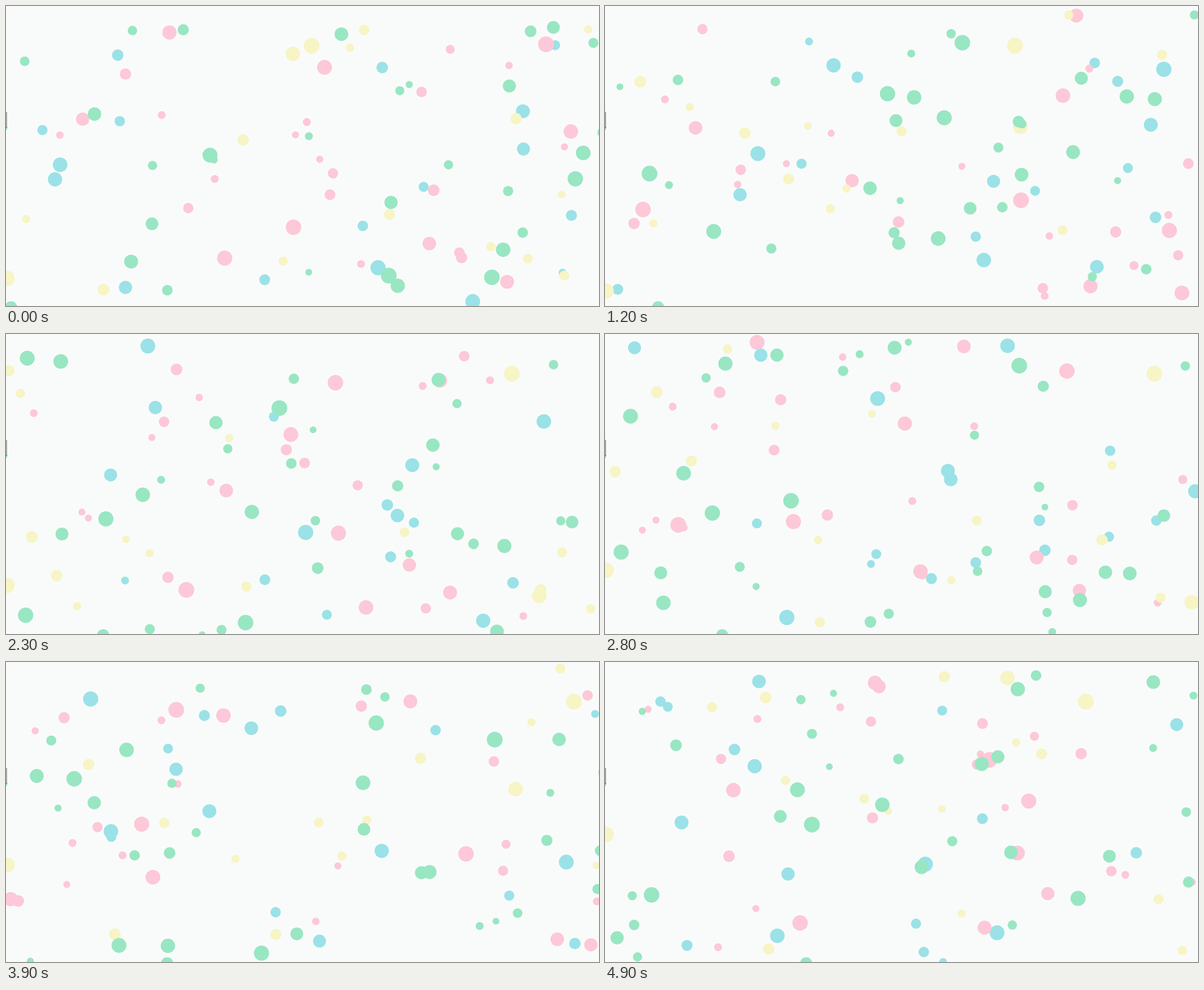
These frames come from a looping animation (1052x533 px, 5 s). An HTML page with a canvas:

```html
<!DOCTYPE html>
<html lang="en">
<head>
<meta charset="utf-8">
<title>Bouncing dots</title>
<style>
  html, body { margin: 0; width: 100%; height: 100%; overflow: hidden; background: #f9fbfa; }
  canvas { display: block; }
</style>
</head>
<body>
<canvas id="stage" width="1052" height="533"></canvas>
<script>
const ctx = document.getElementById('stage').getContext('2d');
const LOOP = 5000, STEP = 100;
const room = { left: -7, right: 1090, top: 0, bottom: 541 };

// Large dots run from the biggest to the smallest radius: [x, y, vx, vy], in px and px/s.
const groups = [
  { color: '#9ae2e7', radii: [13.5, 11.5], small: 10, large: [
    [660, 465, 418, 398], [828, 525, -464, -219], [96, 282, 480, 269], [87, 308, -401, 536],
    [917, 187, 225, 20], [1067, 441, -162, 128], [212, 500, 23, 186], [918, 254, 458, -452]
  ] },
  { color: '#fdc8d8', radii: [14, 11.8], small: 18, large: [
    [958, 68, 380, 231], [510, 393, -470, 250], [388, 448, 511, -41], [565, 109, 471, 334],
    [1002, 223, -158, -297], [290, 47, 476, -433], [889, 490, -44, -402],
    [751, 422, -492, -512], [136, 201, 252, 91]
  ] },
  { color: '#f7f4c5', radii: [14, 13], small: 13, large: [
    [542, 70.5, 154.5, 0], [2, 484, 0, 54], [509, 85, 190, -228]
  ] },
  { color: '#99e6c3', radii: [14, 11], small: 17, large: [
    [679, 479, -500, -151], [862, 482, -190, -433], [1010, 307, -424, -363], [1065, 57, -386, 118],
    [362, 265, -141, 325], [1024, 261, 449, -540], [882, 433, -278, 384], [695, 497, 445, -527],
    [1075, 90, -83, -192], [222, 454, 507, -162], [595, 50, 120, 208], [157, 192, 261, 452],
    [683, 349, -135, 240], [893, 142, -40, -206], [971, 38, -379, 138], [259, 387, 324, -23],
    [9, 535.5, 71, 0]
  ] }
];

let seed = 20177;
function random(min, max) {
  seed = (seed * 1664525 + 1013904223) % 4294967296;
  return min + (max - min) * seed / 4294967296;
}

function makeDots({ color, radii: [big, least], small, large }) {
  const dots = large.map(([x, y, vx, vy], i) =>
    ({ x, y, vx, vy, color, r: big + (least - big) * i / (large.length - 1) }));
  for (let i = 0; i < small; i++) {
    dots.push({
      x: random(5, 1075), y: random(10, 525),
      vx: random(-530, 530), vy: random(-530, 530),
      color, r: random(6, 10.5)
    });
  }
  return dots;
}

// Position after time t of a point reflected between two walls.
function bounce(start, speed, t, min, max) {
  if (!speed) return start;
  const span = max - min;
  const way = start - min + speed * t;
  const phase = ((way % (2 * span)) + 2 * span) % (2 * span);
  return min + (phase < span ? phase : 2 * span - phase);
}

const dots = groups.flatMap(makeDots);

function drawEdgeMark() {
  ctx.fillStyle = '#a8a8a8';
  ctx.fillRect(0, 188, 2, 27);
  ctx.fillStyle = '#3f9a55';
  ctx.fillRect(0, 215, 2, 2);
  ctx.fillStyle = '#9beab0';
  ctx.fillRect(0, 217, 2, 3);
}

function draw(t) {
  ctx.fillStyle = '#f9fbfa';
  ctx.fillRect(0, 0, 1052, 533);
  for (const { x, y, vx, vy, r, color } of dots) {
    ctx.fillStyle = color;
    ctx.beginPath();
    ctx.arc(
      bounce(x, vx, t, room.left + r, room.right - r),
      bounce(y, vy, t, room.top + r, room.bottom - r),
      r, 0, Math.PI * 2);
    ctx.fill();
  }
  drawEdgeMark();
}

const begin = performance.now();
function frame() {
  const elapsed = (performance.now() - begin) % LOOP;
  draw(Math.floor(elapsed / STEP) * STEP / 1000);
  requestAnimationFrame(frame);
}
frame();
</script>
</body>
</html>
```
